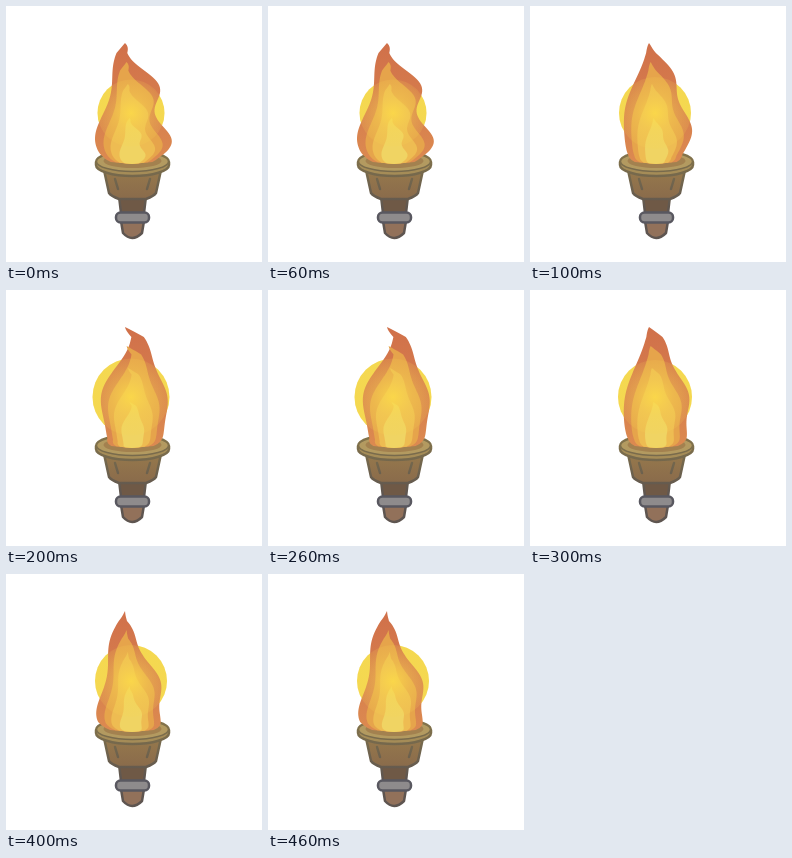
Recreate the animation shown at these times as an HTML page. Size 256x256 px, loop 0.5 s.

```html
<!DOCTYPE html>
<html lang="en">
<head>
<meta charset="utf-8">
<title>Torch</title>
<style>
  html, body { margin: 0; width: 100%; height: 100%; overflow: hidden; background: #fff; }
  svg { display: block; width: 100vw; height: 100vh; }
</style>
</head>
<body>
<svg viewBox="0 0 256 256">
  <defs>
    <linearGradient id="skin" gradientUnits="userSpaceOnUse" x1="0" y1="36" x2="0" y2="158">
      <stop offset="0" stop-color="#d0704a"/>
      <stop offset="1" stop-color="#dc8a50"/>
    </linearGradient>
    <linearGradient id="line" gradientUnits="userSpaceOnUse" x1="0" y1="145" x2="0" y2="205">
      <stop offset="0" stop-color="#85754a"/>
      <stop offset="1" stop-color="#5e5550"/>
    </linearGradient>
    <linearGradient id="wood" gradientUnits="userSpaceOnUse" x1="0" y1="165" x2="0" y2="195">
      <stop offset="0" stop-color="#95784c"/>
      <stop offset="1" stop-color="#896a4b"/>
    </linearGradient>
    <radialGradient id="shine">
      <stop offset="0" stop-color="#fddd48" stop-opacity=".8"/>
      <stop offset=".5" stop-color="#f8d650" stop-opacity=".4"/>
      <stop offset="1" stop-color="#f6d452" stop-opacity=".15"/>
    </radialGradient>
  </defs>
  <g stroke="url(#line)" stroke-width="2.5" stroke-linejoin="round">
    <path d="M115 215L117 227Q126 237 136 227L138 215Z" fill="#92715a"/>
    <path d="M113 190H140L138 207H115Z" fill="#6f5946"/>
    <rect x="110" y="206.500" width="33" height="10" rx="4.500" fill="#8e8b8c" stroke="#595860"/>
    <path d="M98 164L103 187Q105 190 113 193H140Q148 190 150 187L155 164Z" fill="url(#wood)"/>
    <path d="M109 173L112 183M144 173L141 183" fill="none" stroke-linecap="round"/>
    <path d="M90 156A36.500 11 0 0 1 163 156V159A36.500 11 0 0 1 90 159Z" fill="#a58c57"/>
    <ellipse cx="126.500" cy="155.500" rx="36" ry="10" fill="#b39a60" stroke-width="1.500"/>
    <ellipse cx="126.500" cy="155" rx="29" ry="7" fill="#a3814f" stroke="none"/>
  </g>
  <circle id="halo" cx="125" cy="107" fill="#f4d950"/>
  <g id="flame"></g>
  <circle id="glow" cx="125" cy="107" fill="url(#shine)"/>
</svg>
<script>
const BASE = 158, STEP = 100;

// Nested tongues of fire: top edge, size relative to the outermost, fill.
const layers = [
  { top: 37, size: 1, fill: "url(#skin)" },
  { top: 56, size: 0.77, fill: "#e6a44b" },
  { top: 78, size: 0.58, fill: "#eebc52" },
  { top: 112, size: 0.34, fill: "#f0d463" }
];

// Each side of the flame leans and ripples: [lean, ripple size, height of a crest].
const poses = [
  { radius: 33.5, left: [0, 4, 0.45], right: [0, 7, 0.35] },
  { radius: 36, left: [0, 2, 0.85], right: [0, 3.5, 0.24] },
  { radius: 38.5, left: [8, 5, 0.87], right: [9, 2, 0.1] },
  { radius: 37, left: [1, 1.5, 0.18], right: [2, 3, 0.08] },
  { radius: 36, left: [0, 4, 0.56], right: [-11, 3.5, 0.1] }
];

// Horizontal shift of one side at depth s (0 = tip, 1 = base).
function ripple([lean, size, crest], s, period) {
  const taper = Math.min(1, 12 * s, 12 * (1 - s));
  return taper * (lean * (1 - s) + size * Math.cos(2 * Math.PI * (s - crest) / period));
}

function tongue({ top, size }, { left, right }) {
  const leftEdge = [], rightEdge = [];
  for (let i = 0; i <= 60; i++) {
    const s = i / 60;
    const y = top + s * (BASE - top);
    const middle = 126 - 7 * size * (1 - s) ** 4;
    const half = 60 * s ** 0.88 * (1 - s) ** 0.25;
    leftEdge.push([middle + size * (ripple(left, s, 0.7) - half), y]);
    rightEdge.unshift([middle + size * (ripple(right, s, 0.47) + half), y]);
  }
  return "M" + leftEdge.concat(rightEdge).join("L") + "Z";
}

const halo = document.getElementById("halo");
const glow = document.getElementById("glow");
const flame = document.getElementById("flame");
const paths = layers.map(({ fill }) => {
  const path = document.createElementNS("http://www.w3.org/2000/svg", "path");
  path.setAttribute("fill", fill);
  return flame.appendChild(path);
});

function draw() {
  const pose = poses[Math.floor(performance.now() / STEP) % poses.length];
  for (const disc of [halo, glow]) disc.setAttribute("r", pose.radius);
  paths.forEach((path, i) => path.setAttribute("d", tongue(layers[i], pose)));
  requestAnimationFrame(draw);
}
draw();
</script>
</body>
</html>
```
